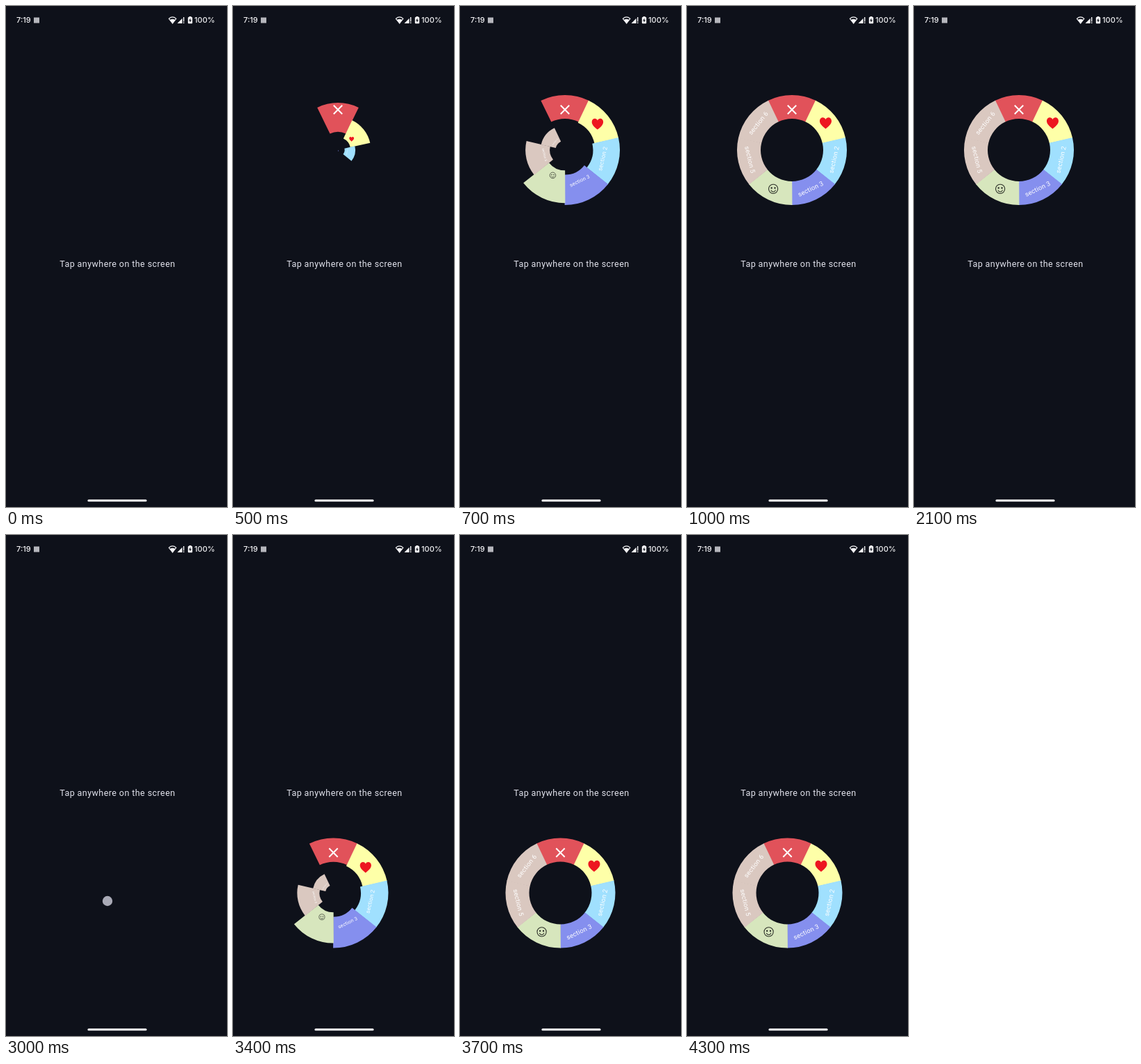
Animation, 318 px wide and 720 px high, one loop 5000 ms. Source, as an HTML page with a canvas:

```html
<!DOCTYPE html>
<html lang="en">
<head>
<meta charset="utf-8">
<title>Radial menu</title>
<style>
  html, body { margin: 0; width: 100%; height: 100%; overflow: hidden; background: #0e111a; }
  canvas { display: block; width: 318px; height: 720px; }
</style>
</head>
<body>
<canvas id="stage"></canvas>
<script>
const WIDTH = 318, HEIGHT = 720, LOOP = 5000, STEP = 100;
const BACKGROUND = '#0e111a';
const OUTER = 79, INNER = 45, FULL_REACH = 117, LABEL_RADIUS = 62;
const GROW = 350, STAGGER = 45;
const SLICE = Math.PI * 2 / 7;
const SEAM = 0.005; // slight overlap that hides hairlines between slices

const canvas = document.getElementById('stage');
const ctx = canvas.getContext('2d');
const ratio = window.devicePixelRatio || 1;
canvas.width = WIDTH * ratio;
canvas.height = HEIGHT * ratio;

const sections = [
  { color: '#e1525a' },
  { color: '#feffa8', icon: drawHeart },
  { color: '#a0e0fe', label: 'section 2' },
  { color: '#858fee', label: 'section 3' },
  { color: '#d7e6bd', icon: drawSmiley },
  { color: '#dac8c0', label: 'section 5' },
  { color: '#dac8c0', label: 'section 6' },
];

const menus = [
  { x: 151, y: 207, press: 300, open: 362, fade: 2140, gone: 2500 },
  { x: 144.5, y: 514.5, press: 3000, open: 3072, fade: Infinity, gone: Infinity },
];

const clamp = v => Math.max(0, Math.min(1, v));
const easeOut = v => Math.sin(v * Math.PI / 2);

function disc(x, y, radius, color) {
  ctx.fillStyle = color;
  ctx.beginPath();
  ctx.arc(x, y, radius, 0, Math.PI * 2);
  ctx.fill();
}

function polygon(color, ...points) {
  ctx.fillStyle = color;
  ctx.beginPath();
  points.forEach(([x, y]) => ctx.lineTo(x, y));
  ctx.fill();
}

function text(string, x, y, font, color, spacing = 0, align = 'left') {
  ctx.font = font;
  ctx.letterSpacing = spacing + 'px';
  ctx.textAlign = align;
  ctx.fillStyle = color;
  ctx.fillText(string, x, y);
}

function drawHeart() {
  ctx.fillStyle = '#ed1620';
  ctx.beginPath();
  ctx.moveTo(0, 8.2);
  ctx.bezierCurveTo(-4, 5, -8.5, 1.5, -8.5, -3);
  ctx.bezierCurveTo(-8.5, -8.5, -2, -9.8, 0, -5.4);
  ctx.bezierCurveTo(2, -9.8, 8.5, -8.5, 8.5, -3);
  ctx.bezierCurveTo(8.5, 1.5, 4, 5, 0, 8.2);
  ctx.fill();
}

function drawSmiley() {
  ctx.strokeStyle = '#2c3028';
  ctx.lineWidth = 1.1;
  ctx.beginPath();
  ctx.arc(0, 0, 6.6, 0, Math.PI * 2);
  ctx.moveTo(3.3, 1.8);
  ctx.arc(0, 0.6, 3.5, 0.35, Math.PI - 0.35);
  ctx.stroke();
  disc(-2.4, -1.3, 1.2, '#2c3028');
  disc(2.4, -1.3, 1.2, '#2c3028');
}

function drawCross(x, y) {
  const s = 6.2;
  ctx.strokeStyle = '#fff';
  ctx.lineWidth = 2;
  ctx.beginPath();
  ctx.moveTo(x - s, y - s);
  ctx.lineTo(x + s, y + s);
  ctx.moveTo(x + s, y - s);
  ctx.lineTo(x - s, y + s);
  ctx.stroke();
}

function drawSection({ color, icon, label }, index, progress) {
  const angle = index * SLICE;
  const start = angle - SLICE / 2 - Math.PI / 2 - SEAM;
  const end = start + SLICE + 2 * SEAM;
  ctx.fillStyle = color;
  ctx.beginPath();
  ctx.arc(0, 0, Math.min(OUTER, FULL_REACH * progress), start, end);
  ctx.arc(0, 0, INNER * progress, end, start, true);
  ctx.fill();

  ctx.save();
  ctx.scale(progress, progress);
  ctx.translate(LABEL_RADIUS * Math.sin(angle), -LABEL_RADIUS * Math.cos(angle));
  if (icon) icon();
  if (label) {
    // Labels in the lower half are flipped so they stay readable.
    ctx.rotate(Math.cos(angle) < 0 ? angle + Math.PI : angle);
    text(label, 0, 3.2, '9.3px Roboto, sans-serif', '#fff', 0.2, 'center');
  }
  ctx.restore();
}

function drawMenu(menu, time) {
  if (time >= menu.press && time < menu.press + STEP) {
    disc(menu.x + 1.5, menu.y + 11.5, 7.2, '#a9aab6');
  }
  if (time < menu.open || time >= menu.gone) return;
  ctx.save();
  ctx.globalAlpha = 1 - clamp((time - menu.fade) / (menu.gone - menu.fade) || 0);
  ctx.translate(menu.x, menu.y);
  sections.forEach((section, i) => {
    const progress = easeOut(clamp((time - menu.open - i * STAGGER) / GROW));
    if (progress > 0) drawSection(section, i, progress);
  });
  drawCross(0, -58);
  ctx.restore();
}

function drawStatusBar() {
  const white = '#f4f4f6', font = '500 11px Inter, sans-serif';
  text('7:19', 15, 24.2, font, white);
  text('100%', 271, 24.2, font, white);
  ctx.fillStyle = '#b5b6bc';
  ctx.fillRect(40, 16.5, 8, 8);

  // Wi-Fi fan
  ctx.strokeStyle = white;
  ctx.lineWidth = 1.1;
  ctx.beginPath();
  ctx.moveTo(239.6, 25);
  ctx.lineTo(234.4, 18.2);
  ctx.quadraticCurveTo(239.6, 13.6, 244.8, 18.2);
  ctx.closePath();
  ctx.stroke();
  ctx.fillStyle = white;
  ctx.beginPath();
  ctx.moveTo(239.6, 25);
  ctx.lineTo(235.8, 20);
  ctx.quadraticCurveTo(239.6, 17.4, 243.4, 20);
  ctx.fill();

  // Signal strength
  polygon(white, [246.5, 25], [253.6, 17.8], [253.6, 25]);
  ctx.fillRect(255, 16, 1.4, 6.5);
  ctx.fillRect(255, 23.5, 1.4, 1.5);

  // Charging battery
  ctx.fillRect(263.4, 15, 3.2, 2);
  ctx.beginPath();
  ctx.roundRect(261.8, 16, 6.4, 9.2, 1);
  ctx.fill();
  polygon(BACKGROUND, [265.4, 17.6], [263.1, 21.2], [264.6, 21.2],
    [264.6, 23.8], [266.9, 20.2], [265.4, 20.2]);
}

function draw(time) {
  ctx.setTransform(ratio, 0, 0, ratio, 0, 0);
  ctx.fillStyle = BACKGROUND;
  ctx.fillRect(0, 0, WIDTH, HEIGHT);
  drawStatusBar();
  text('Tap anywhere on the screen', 77.2, 375, '12.5px Roboto, sans-serif', '#e1e2ec', 0.43);
  menus.forEach(menu => drawMenu(menu, time));
  ctx.fillStyle = '#fff';
  ctx.beginPath();
  ctx.roundRect(117.4, 709.2, 85.2, 3.1, 1.55);
  ctx.fill();
}

const origin = performance.now();
function tick() {
  const elapsed = (performance.now() - origin) % LOOP;
  draw(Math.floor(elapsed / STEP) * STEP);
  requestAnimationFrame(tick);
}
tick();
</script>
</body>
</html>
```
